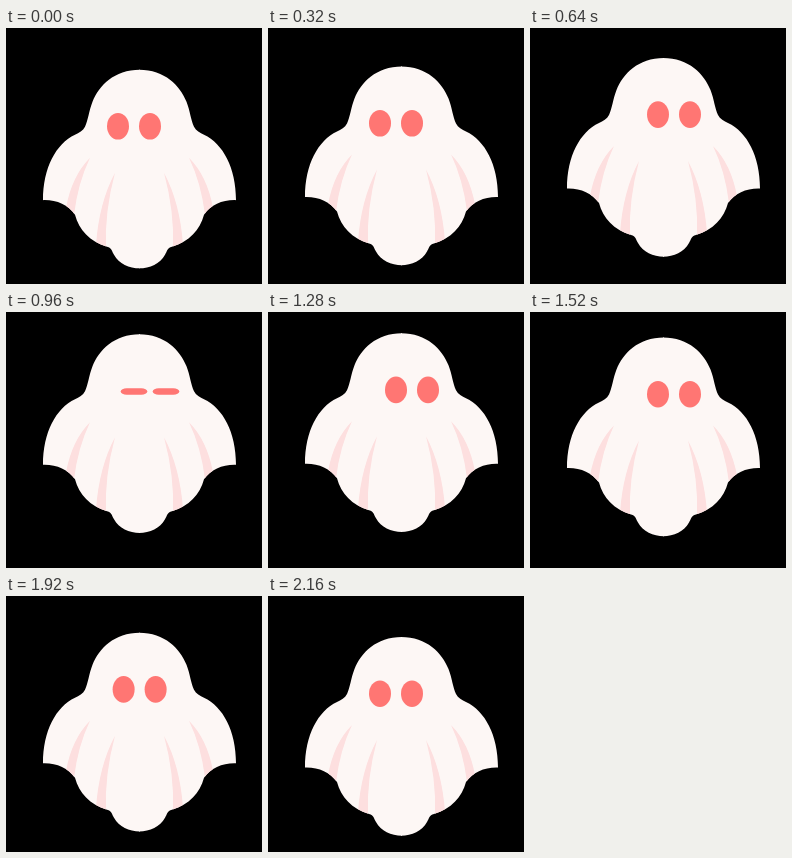
Recreate the animation shown at these times as an HTML page with a canvas. Size 256x256 px, loop 2240 ms.

```html
<!DOCTYPE html>
<html lang="en">
<head>
<meta charset="utf-8">
<title>Floating ghost</title>
<style>
  html, body { margin: 0; width: 100%; height: 100%; overflow: hidden; background: #000; }
  canvas { display: block; width: 256px; height: 256px; }
</style>
</head>
<body>
<canvas id="stage" width="256" height="256"></canvas>
<script>
const ctx = document.getElementById('stage').getContext('2d');
const LOOP = 2240, STEP = 80, AXIS = 133.5;
const SHEET = '#fdf7f5', FOLD = '#fddfdf', EYE = '#ff7673';

// Half outlines, mirrored around AXIS; y = 0 is the top of the head.
const half = new Path2D(
  'M134 0 C108 0 93 16 86.5 32 C83 41 82 51 79 57 C77 61 73 63 69 65 ' +
  'C50 74 37 98 37 130.5 C50 130 62 135 69 145 C73 160 84 172 101 177 ' +
  'C106 178 106 182 108 185 C113 194 123 198.7 134 198.7 Z');
const folds = new Path2D(
  'M84 88 Q72 113 68 145 L60 138 Q66 106 84 88 Z ' +
  'M109 103 Q98.5 142 100 178 L90 175 Q93 133 109 103 Z');

const clamp = v => Math.min(1, Math.max(0, v));
const mix = (a, b, k) => a + (b - a) * k;
const ease = (t, from, to) => {
  const k = clamp((t - from) / (to - from));
  return k * k * (3 - 2 * k);
};

function drawHalf() {
  ctx.fillStyle = SHEET;
  ctx.fill(half);
  ctx.save();
  ctx.clip(half);
  ctx.fillStyle = FOLD;
  ctx.fill(folds);
  ctx.restore();
}

// Open eyes are ellipses; shut ones are flat bars with round ends.
function drawEyes(t) {
  const look = 16 * (ease(t, 320, 640) - ease(t, 1680, 2080));
  const shut = clamp(1 - Math.abs(t - 960) / 160);
  const rx = mix(11, 13.3, shut), ry = mix(13.3, 3.3, shut);
  const y = mix(56.6, 57.2, shut), corner = { x: mix(11, 6, shut), y: ry };
  ctx.fillStyle = EYE;
  for (const x of [112, 144]) {
    ctx.beginPath();
    ctx.roundRect(x + look - rx, y - ry, 2 * rx, 2 * ry, corner);
    ctx.fill();
  }
}

function draw(t) {
  const y = 31.2 + 10.5 * Math.cos(2 * Math.PI * (t - 40) / LOOP);
  ctx.fillStyle = '#000';
  ctx.fillRect(0, 0, 256, 256);
  ctx.save();
  ctx.translate(0, y);
  drawHalf();
  ctx.save();
  ctx.translate(2 * AXIS, 0);
  ctx.scale(-1, 1);
  drawHalf();
  ctx.restore();
  drawEyes(t);
  ctx.restore();
}

const start = performance.now();
function tick() {
  const t = (performance.now() - start) % LOOP;
  draw(Math.floor(t / STEP) * STEP);
  requestAnimationFrame(tick);
}
tick();
</script>
</body>
</html>
```
